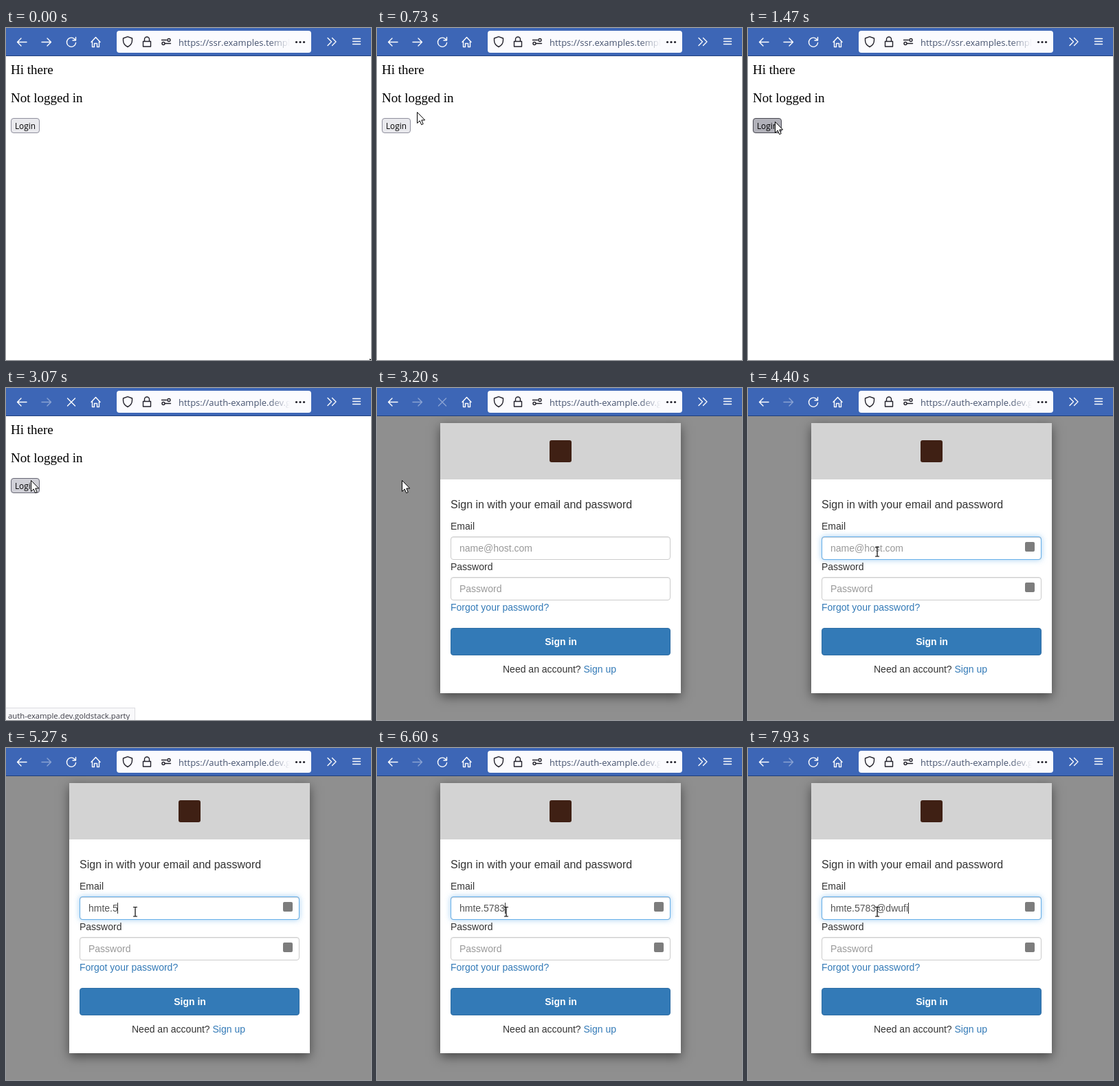
An HTML page for the animation above (8 s loop, 531 by 483 pixels).

```html
<!DOCTYPE html>
<html lang="en">
<head>
<meta charset="utf-8">
<title>Login flow</title>
<style>
  html, body { margin: 0; width: 100%; height: 100%; overflow: hidden; background: #fff; }
  #stage { position: relative; width: 531px; height: 483px; overflow: hidden; }
  #stage div, svg { position: absolute; box-sizing: border-box; }
  svg { left: 0; top: 0; }
  .bar { left: 0; top: 0; width: 531px; height: 41px; background: #3d66b6; border-bottom: 1px solid #1f3f7c; }
  .address { left: 161px; top: 4px; width: 283px; height: 32px; background: #fbfbfe; border-radius: 4px; }
  #button { left: 7px; top: 131px; width: 42px; height: 22px; border: 1px solid #8f8f9d; border-radius: 4px; background: #e9e9ed; }
  #button.hover { background: #d0d0d7; border-color: #676774; }
  #button.active { background: #b1b1b9; border-color: #484851; }
  #status { left: -1px; top: 465px; width: 189px; height: 19px; background: #f9f9fb; border: 1px solid #dcdce0; }
  #login { left: 0; top: 41px; width: 531px; height: 442px; background: #8f8f8f; overflow: hidden; }
  .panel { left: 92px; top: 10px; width: 350px; height: 393px; background: #fff; box-shadow: 0 5px 15px rgba(0,0,0,.5); }
  .head { left: 0; top: 0; width: 350px; height: 82px; background: #d3d3d3; }
  .logo { left: 159px; top: 25px; width: 32px; height: 32px; background: #3f2014; border-radius: 3px; }
  .field { left: 15px; width: 320px; height: 34px; border: 1px solid #ccc; border-radius: 4px; box-shadow: inset 0 1px 1px rgba(0,0,0,.075); }
  .email { top: 165px; }
  .password { top: 224px; }
  #focus { border-color: #66afe9; box-shadow: inset 0 1px 1px rgba(0,0,0,.075), 0 0 8px rgba(102,175,233,.6); }
  .submit { left: 15px; top: 298px; width: 320px; height: 40px; background: #337ab7; border: 1px solid #2e6da4; border-radius: 4px; }
  .ui { font-family: "Open Sans", "Noto Sans", sans-serif; }
  .serif { font: 19px "Liberation Serif", "Times New Roman", serif; }
  .sans { font: 14px "Liberation Sans", Arial, sans-serif; fill: #333; }
  .sans .link { fill: #337ab7; }
  .sans .hint { fill: #999; }
  .line { fill: none; stroke: #fff; stroke-width: 1.4; stroke-linecap: round; stroke-linejoin: round; }
  .dark { stroke: #23222b; }
</style>
</head>
<body>
<div id="stage">
  <div id="button"></div>
  <div id="status"></div>
  <div id="login">
    <div class="panel">
      <div class="head"><div class="logo"></div></div>
      <div class="field email"></div>
      <div class="field email" id="focus"></div>
      <div class="field password"></div>
      <div class="submit"></div>
    </div>
  </div>
  <div class="bar"></div>
  <div class="address"></div>

  <svg width="531" height="483" viewBox="0 0 531 483">
    <defs>
      <linearGradient id="fade" gradientUnits="userSpaceOnUse" x1="383" x2="413" y1="0" y2="0">
        <stop offset="0" stop-color="#46536f"/>
        <stop offset="1" stop-color="#46536f" stop-opacity="0"/>
      </linearGradient>
    </defs>

    <g class="line">
      <path d="M30 20.5H16.5M22 15l-5.500 5.500 5.500 5.500"/>
      <path id="forward" d="M52 20.500H65.500M60 15l5.500 5.500-5.500 5.500"/>
      <path id="reload" d="M100.800 17.500A6.600 6.600 0 1 0 101.600 21.500M101.500 13.500V18H97"/>
      <path id="stop" d="M89.500 15l11 11M100.500 15l-11 11"/>
      <path d="M124 20.500L130.500 13.500 137 20.500M125.500 19.500V27.500H128.500V22.500H132.500V27.500H135.500V19.500"/>
      <path d="M468 14.500l5.500 5.500-5.500 5.500M474.500 14.500l5.500 5.500-5.500 5.500"/>
      <path d="M504.500 15.500h11M504.500 19.500h11M504.500 23.500h11"/>
      <g class="dark">
        <path d="M177 12.700l6.500 2.300v3c0 5-3 7.800-6.500 9.500-3.500-1.700-6.500-4.500-6.500-9.500v-3z"/>
        <path d="M201.500 19.500v-3a3.500 3.500 0 0 1 7 0v3M199.500 19.500h11v7.500h-11z"/>
        <path d="M226.500 17.500h7M231.500 22.500h8"/>
        <circle cx="237" cy="17.500" r="2"/>
        <circle cx="229" cy="22.500" r="2"/>
      </g>
    </g>
    <g fill="#23222b">
      <circle cx="422.500" cy="20.500" r="1.600"/><circle cx="428" cy="20.500" r="1.600"/><circle cx="433.500" cy="20.500" r="1.600"/>
    </g>
    <text id="url" class="ui" x="251" y="26" font-size="13" fill="url(#fade)"></text>

    <g id="homeText">
      <g class="serif"><text x="7" y="67">Hi there</text><text x="7" y="108">Not logged in</text></g>
      <text class="ui" x="13" y="147" font-size="11.800">Login</text>
    </g>
    <text id="statusText" class="ui" x="3" y="481" font-size="11.300" fill="#3c3c46">auth-example.dev.goldstack.party</text>

    <g id="loginText" class="sans">
      <text x="107" y="175" font-size="16">Sign in with your email and password</text>
      <text x="107" y="206">Email</text>
      <text x="107" y="265">Password</text>
      <text class="hint" id="hint" x="120" y="238">name@host.com</text>
      <text class="hint" x="120" y="297">Password</text>
      <text class="link" x="107" y="324">Forgot your password?</text>
      <text x="267.500" y="374" text-anchor="middle" font-weight="bold" style="fill:#fff">Sign in</text>
      <text x="183" y="414">Need an account? <tspan class="link">Sign up</tspan></text>
      <text id="typed" x="120" y="238" style="fill:#555"></text>
      <rect id="caret" y="225" width="1" height="16" fill="#333"/>
      <g id="badges" fill="#7d7d7d">
        <rect x="403" y="224" width="14" height="14" rx="2"/>
        <rect x="403" y="283" width="14" height="14" rx="2"/>
      </g>
    </g>

    <path id="arrow" d="M.5.500V16.500L4.200 13 6.700 18.700 9.200 17.600 6.800 12H11.700Z" fill="#fff" stroke="#000"/>
    <path id="beam" d="M-3 -6.500h2.500l.5.500.5-.500h2.500M0 -6V6.500M-3 7h2.500l.5-.500.5.500h2.500" fill="none" stroke="#000" stroke-width="1.200"/>
  </svg>
</div>

<script>
const LOOP = 8000;
const ADDRESS = "hmte.5783@dwufi";
const KEYS = [4600, 4670, 4870, 5000, 5200, 5270, 5470, 5670, 6600, 6870, 7130, 7330, 7400, 7530, 7930];
const CARET_OFF = [[4400, 4600], [5470, 5530], [6070, 6600], [7530, 7670]];
// time, x, y of the pointer
const PATH = [
  [0, 529, 481], [130, 490, 450], [330, 330, 325], [530, 150, 185], [670, 72, 128], [730, 58, 122],
  [870, 43, 135], [1000, 41, 135], [1130, 39, 136], [2070, 39, 136], [2130, 36, 134],
  [3270, 36, 134], [3470, 92, 176], [3670, 172, 228], [3800, 188, 238]
];

const $ = id => document.getElementById(id);
const show = (id, on) => { $(id).style.visibility = on ? "visible" : "hidden"; };
const within = (t, from, to) => t >= from && t < to;

function pointerAt(t) {
  const i = PATH.findIndex(p => p[0] > t);
  if (i < 0) return PATH[PATH.length - 1].slice(1);
  const [t0, x0, y0] = PATH[i - 1], [t1, x1, y1] = PATH[i];
  const k = (t - t0) / (t1 - t0);
  return [Math.round(x0 + (x1 - x0) * k), Math.round(y0 + (y1 - y0) * k)];
}

function render(time) {
  // the screen refreshes 15 times a second
  const t = Math.round(Math.floor(time * .015 + .06) / .15) * 10;
  const [x, y] = pointerAt(t);
  const login = t >= 3200;

  show("button", !login);
  show("homeText", !login);
  $("login").style.display = $("loginText").style.display = login ? "" : "none";
  const over = x >= 7 && x < 49 && y >= 131 && y < 153;
  $("button").className = within(t, 1470, 1600) ? "active" : over ? "hover" : "";

  const status = within(t, 1800, 3200);
  show("status", status);
  show("statusText", status);
  $("url").textContent = t < 3070 ? "https://ssr.examples.templates" : "https://auth-example.dev.goldstack";
  $("forward").style.opacity = t < 3070 ? 1 : .4;
  const loading = within(t, 1670, 3400);
  show("stop", loading);
  show("reload", !loading);
  $("stop").style.opacity = login ? .4 : 1;

  $("focus").style.opacity = Math.max(0, Math.min(1, (t - 3865) / 200));
  show("badges", t >= 3470);
  const count = KEYS.filter(k => t >= k).length;
  $("typed").textContent = ADDRESS.slice(0, count);
  show("hint", count === 0);
  show("caret", t >= 3930 && !CARET_OFF.some(([a, b]) => within(t, a, b)));
  const width = login && count ? $("typed").getComputedTextLength() : 0;
  $("caret").setAttribute("x", Math.round(120 + width - .5));

  const beam = login && x >= 107 && y >= 216;
  show("beam", beam);
  show("arrow", !beam);
  $(beam ? "beam" : "arrow").setAttribute("transform", `translate(${x} ${y})`);
}

const start = performance.now();
function loop() {
  render((performance.now() - start) % LOOP);
  requestAnimationFrame(loop);
}
loop();
</script>
</body>
</html>
```
